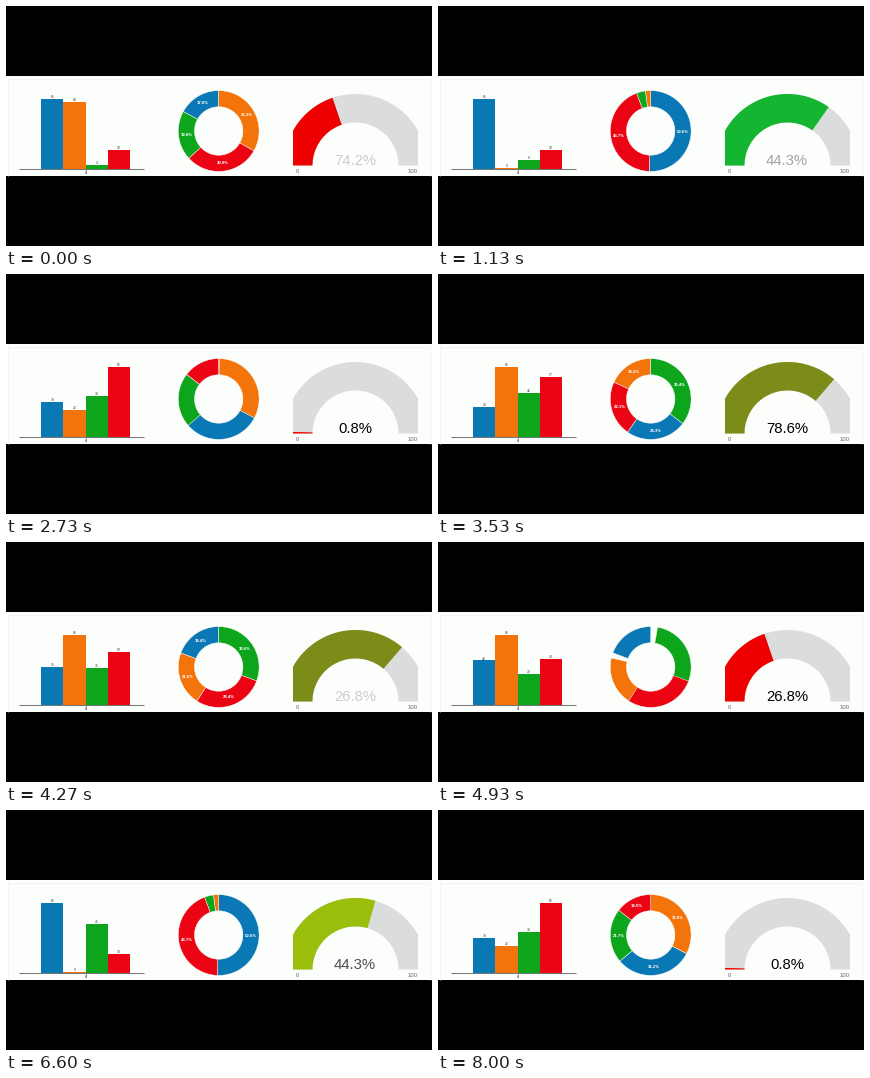
Write a matplotlib script that moves like this. It is 426 by 240 pixels and loops after 8.07 s.

```python
import numpy as np
import matplotlib.pyplot as plt
from matplotlib.animation import FuncAnimation
from matplotlib.patches import Polygon, Rectangle

W, H, DPI = 426, 240, 64
LOOP, TICK, STEPS = 8070, 30, 121
plt.rcParams["font.family"] = "Liberation Sans"

PAPER = "#fcfefc"
COLORS = ["#0a78b4", "#f3740a", "#0ca51c", "#eb0514"]  # blue, orange, green, red

# Five data sets in turn
BARS = np.array([[70, 67, 4, 19], [70, 0.5, 52, 23], [34.5, 27, 40.5, 70],
                 [30, 70, 44, 60], [38, 70, 37, 53]])
SHARES = np.array([[17.0, 33.2, 19.8, 30.0], [50.6, 2.1, 3.6, 43.7],
                   [31.2, 32.6, 21.7, 14.5], [24.3, 18.2, 35.4, 22.1],
                   [19.4, 21.6, 30.6, 28.4]])
READOUTS = ["74.2%", "44.3%", "0.8%", "78.6%", "26.8%"]
ARCS = [0.702, 0.572, 0.008, 0.726, 0.395]
RED, GREEN, LIME, OLIVE = (np.array(c) / 255 for c in
                           [(238, 0, 0), (12, 180, 50), (176, 192, 5), (125, 140, 25)])
TINTS = [GREEN, LIME, RED, OLIVE, RED]

# Bars and donut switch together, the gauge follows (ms)
PERIOD, FIRST, GAUGE_LAG = 1067, -510, 435
BAR_TIME, BAR_STAGGER = 300, 245
PIE_TIME, GAUGE_TIME, FADE_TIME = 500, 450, 400

BASE, BAR_W = 162.8, 22.2
PIE = (212.7, 125)
GAUGE = (349.5, 159.5)


def ease(u, power=3):
    u = np.clip(u, 0, 1)
    k = 2 ** (power - 1)
    return np.where(u < 0.5, k * u**power, 1 - k * (1 - u)**power)


def phase(t, lag=0):
    """Previous state, current state and time since the switch."""
    k, dt = divmod(t - FIRST - lag, PERIOD)
    return int(k - 1) % 5, int(k) % 5, dt


def mix(a, b, p):
    return a * (1 - p) + b * p


def polar(center, r, a):
    """Points at clockwise turns a (0 = top, 1 = full circle)."""
    a = 2 * np.pi * np.asarray(a)
    return np.column_stack([center[0] + r * np.sin(a), center[1] - r * np.cos(a)])


def ring(center, r0, r1, a, b):
    turns = np.linspace(a, b, 90)
    return np.vstack([polar(center, r1, turns), polar(center, r0, turns[::-1])])


def slices(shares):
    """Start and end turns, largest share first."""
    order = np.argsort(-shares)
    ends = np.empty(4)
    ends[order] = np.cumsum(shares[order]) / 100
    return np.array([ends - shares / 100, ends])


fig = plt.figure(figsize=(W / DPI, H / DPI), dpi=DPI, facecolor="black")
ax = fig.add_axes([0, 0, 1, 1])
ax.set(xlim=(0, W), ylim=(H, 0))
ax.axis("off")


def px(size):
    return size * 72 / DPI


def label(x, y, s, size, color, **kw):
    kw = {"ha": "center", "va": "baseline", **kw}
    return ax.text(x, y, s, fontsize=px(size), color=color, **kw)


def line(xs, ys, width, color):
    return ax.plot(xs, ys, color=color, lw=px(width), solid_capstyle="butt")[0]


ax.add_patch(Rectangle((0, 70), W, 100, fc=PAPER, ec="none"))
line([1.5, 1.5, 423.5, 423.5], [170, 72.5, 72.5, 170], 0.7, "#eef0ee")

# Bar chart
bars, bar_labels = [], []
for i, c in enumerate(COLORS):
    x = 35.2 + BAR_W * i
    bars.append(ax.add_patch(Rectangle((x, BASE), BAR_W, 0, fc=c, ec="none")))
    bar_labels.append(label(x + BAR_W / 2, BASE, "", 3.4, "#444444"))
line([13, 137.5], [162.6, 162.6], 0.8, "#555555")
line([79.6, 79.6], [163, 164.6], 0.6, "#555555")
label(79.6, 168, "A", 3.2, "#444444")

# Donut
wedges = [ax.add_patch(Polygon(np.zeros((3, 2)), fc=c, ec=PAPER, lw=px(0.45)))
          for c in COLORS]
share_labels = [label(0, 0, "", 4.2, "white", weight="bold", va="center")
                for _ in COLORS]

# Gauge
window = Rectangle((287.3, 80), 124.7, 90, transform=ax.transData)
track = ax.add_patch(Polygon(ring(GAUGE, 43, 71.5, -0.25, 0.25),
                             fc="#dadddb", ec="none"))
fill = ax.add_patch(Polygon(np.zeros((3, 2)), ec="none"))
for part in (track, fill):
    part.set_clip_path(window)
readout = label(349, 158.8, "", 14.9, "black")
label(291.3, 166.8, "0", 6, "#666666")
label(407, 166.8, "100", 6, "#666666")


def draw_bars(t):
    old, new, dt = phase(t)
    # falling bars go at once, rising ones follow from left to right
    delay = np.where(BARS[new] > BARS[old], BAR_STAGGER * np.arange(4), 0)
    heights = mix(BARS[old], BARS[new], ease((dt - delay) / BAR_TIME))
    for bar, txt, h in zip(bars, bar_labels, heights):
        bar.set_bounds(bar.get_x(), BASE - h, BAR_W, h)
        txt.set_y(BASE - h - 0.9)
        txt.set_text(f"{h * 0.95:.0f}")


def draw_pie(t):
    old, new, dt = phase(t)
    spans = mix(slices(SHARES[old]), slices(SHARES[new]), ease(dt / PIE_TIME))
    for wedge, txt, a, b, share in zip(wedges, share_labels, *spans, SHARES[new]):
        wedge.set_xy(ring(PIE, 24.2, 40.4, a, b))
        txt.set_position(polar(PIE, 32.2, [(a + b) / 2])[0])
        txt.set_text(f"{share:.1f}%")
        txt.set_visible(dt >= PIE_TIME and share > 5)


def draw_gauge(t):
    old, new, dt = phase(t, GAUGE_LAG)
    p = float(ease(dt / GAUGE_TIME, 5))
    fill.set_xy(ring(GAUGE, 43, 71.5, -0.25, mix(ARCS[old], ARCS[new], p) / 2 - 0.25))
    fill.set_facecolor(mix(TINTS[old], TINTS[new], p))
    readout.set_text(READOUTS[new])
    readout.set_alpha(min(1, dt / FADE_TIME))


def update(i):
    step = LOOP / STEPS
    t = step * int((i * TICK + TICK - 1) / step)
    draw_bars(t)
    draw_pie(t)
    draw_gauge(t)
    return []


anim = FuncAnimation(fig, update, frames=LOOP // TICK, interval=TICK,
                     init_func=lambda: [], repeat=True, repeat_delay=0)
plt.show()
```
